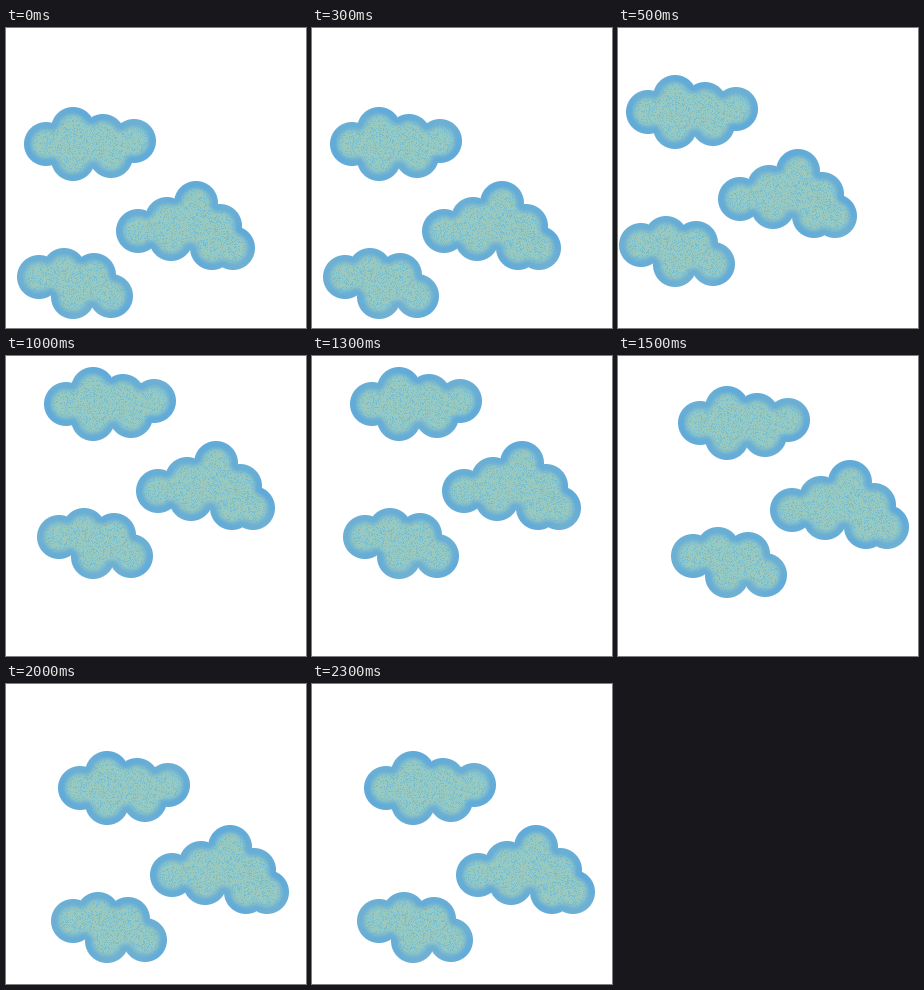
Recreate the animation shown at these times as an HTML page with a canvas. Size 300 px wide and 300 px high, loop 2.5 s.

```html
<!DOCTYPE html>
<html lang="en">
<head>
<meta charset="utf-8">
<title>Clouds</title>
<style>
html, body { margin: 0; width: 100%; height: 100%; overflow: hidden; background: #fff; }
canvas { display: block; }
</style>
</head>
<body>
<canvas id="stage" width="300" height="300"></canvas>
<script>
const SIZE = 300, RADIUS = 22, HOLD = 500;
const ctx = document.getElementById('stage').getContext('2d');

// Puff centres of each cloud
const clouds = [
  [[40, 116], [67, 101], [97, 108], [128, 113], [67, 131], [105, 128]],
  [[132, 203], [161, 191], [190, 175], [214, 198], [227, 220], [206, 220], [165, 211], [190, 194]],
  [[33, 249], [58, 242], [88, 247], [105, 268], [67, 269]]
];
const poses = [[0, 0], [-10, -32], [20, -68], [42, -49], [34, -12]];

let seed = 7;
function random() {
  seed = (seed * 1664525 + 1013904223) >>> 0;
  return seed / 4294967296;
}

const clamp = v => Math.max(0, Math.min(1, v));
const smooth = (a, b, v) => {
  const t = clamp((v - a) / (b - a));
  return t * t * (3 - 2 * t);
};
const mix = (a, b, t) => a.map((v, i) => v + (b[i] - v) * t);

function cover(puffs, x, y) {
  return Math.max(...puffs.map(([px, py]) => RADIUS - Math.hypot(x - px, y - py)));
}

function outline(puffs) {
  const points = [];
  for (const [px, py] of puffs) {
    for (let i = 0; i < 72; i++) {
      const a = i * Math.PI / 36;
      const x = px + RADIUS * Math.cos(a), y = py + RADIUS * Math.sin(a);
      if (cover(puffs, x, y) < 0.01) points.push([x, y]);
    }
  }
  return points;
}

// Blue rim that breaks up into a pale, grainy middle
function grain(x, y, depth) {
  const tint = 0.5 + 0.5 * Math.sin(x / 17) * Math.cos(y / 13);
  const rim = mix([96, 170, 217], [112, 177, 210], tint);
  const inside = smooth(4, 13, depth);
  const base = mix(rim, [139, 197, 200], inside);
  const roll = random();
  const speck = roll < 0.25 ? [108, 182, 214] : roll < 0.7 ? [152, 207, 192] : [170, 200, 181];
  return mix(base, speck, 0.6 * inside);
}

function paintClouds() {
  const sprite = document.createElement('canvas');
  sprite.width = sprite.height = SIZE;
  const pen = sprite.getContext('2d');
  const image = pen.createImageData(SIZE, SIZE);
  for (const puffs of clouds) {
    const edge = outline(puffs);
    for (let y = 0; y < SIZE; y++) {
      for (let x = 0; x < SIZE; x++) {
        const cx = x + 0.5, cy = y + 0.5;
        const alpha = clamp(cover(puffs, cx, cy) + 0.5);
        if (!alpha) continue;
        let nearest = Infinity;
        for (const [ex, ey] of edge) {
          nearest = Math.min(nearest, (cx - ex) ** 2 + (cy - ey) ** 2);
        }
        image.data.set([...grain(cx, cy, Math.sqrt(nearest)), alpha * 255], (y * SIZE + x) * 4);
      }
    }
  }
  pen.putImageData(image, 0, 0);
  return sprite;
}

const sprite = paintClouds();
const start = performance.now();

function draw(now) {
  const step = Math.floor(Math.max(0, now - start) / HOLD) % poses.length;
  ctx.fillStyle = '#fff';
  ctx.fillRect(0, 0, SIZE, SIZE);
  ctx.drawImage(sprite, ...poses[step]);
  requestAnimationFrame(draw);
}
draw(start);
</script>
</body>
</html>
```
